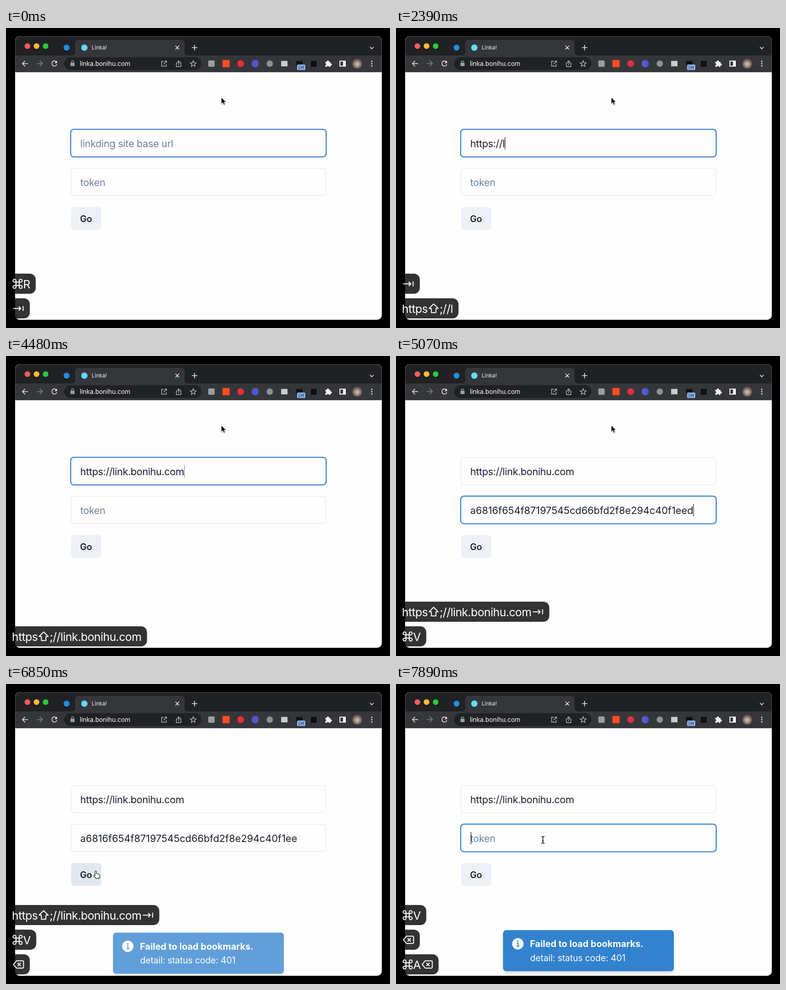
An HTML page that plays this animation: 843 px wide and 657 px high, repeating every 8000 ms.

```html
<!DOCTYPE html>
<html lang="en">
<head>
<meta charset="utf-8">
<title>Linka!</title>
<style>
html, body { margin: 0; width: 100%; height: 100%; overflow: hidden; background: #000; }
svg { display: block; width: 843px; height: 657px; }
text { font-family: Inter, "Liberation Sans", sans-serif; white-space: pre; }
.line { fill: none; stroke: #e8eaed; stroke-width: 1.6; }
.thin { fill: none; stroke: #bdc1c6; stroke-width: 1.3; }
.field { font-size: 21.8px; }
.key { font-size: 24.9px; letter-spacing: -.55px; fill: #fff; }
.glyph { fill: none; stroke: #fff; stroke-width: 2; stroke-linejoin: round; }
</style>
</head>
<body>
<svg viewBox="0 0 843 657" xmlns="http://www.w3.org/2000/svg">
  <defs>
    <clipPath id="win"><rect x="20" y="18" width="805" height="621" rx="10"/></clipPath>
    <radialGradient id="fur" cy=".55">
      <stop offset="0" stop-color="#d9cdc6"/><stop offset=".55" stop-color="#9b8880"/><stop offset="1" stop-color="#5d4a45"/>
    </radialGradient>
    <filter id="soft" x="-10%" y="-20%" width="120%" height="150%">
      <feDropShadow dx="0" dy="5" stdDeviation="3" flood-opacity=".12"/>
    </filter>
    <filter id="lift" x="-50%" y="-50%" width="200%" height="200%">
      <feDropShadow dx="0" dy="1" stdDeviation="1" flood-opacity=".35"/>
    </filter>
  </defs>
  <rect width="843" height="657"/>
  <g clip-path="url(#win)">
    <rect x="20" y="18" width="805" height="621" fill="#fefefe"/>
    <rect x="20" y="18" width="805" height="42" fill="#202124"/>
    <rect x="20" y="60" width="805" height="37" fill="#35363a"/>
    <rect x="20" y="96" width="805" height="1" fill="#55565a"/>
    <path d="M144 60q8 0 8-8V34q0-8 8-8H384q8 0 8 8V52q0 8 8 8z" fill="#35363a"/>
    <circle cx="47" cy="39.700" r="6.200" fill="#ff5f57"/>
    <circle cx="67" cy="39.700" r="6.200" fill="#febc2e"/>
    <circle cx="87" cy="39.700" r="6.200" fill="#28c840"/>
    <circle cx="133" cy="43" r="6.500" fill="#1c8fe3"/>
    <circle cx="172" cy="43" r="7" fill="#61dafb"/>
    <text x="188" y="47" font-size="12" fill="#f1f3f4">Linka!</text>
    <path class="line" d="M372 39l8 8m0-8l-8 8M414 37v12m-6-6h12M799 41.500l4 4 4-4"/>
    <path class="line" d="M48.500 78H36.500m5.500-6l-6 6 6 6"/>
    <path class="line" style="stroke:#808387" d="M67.500 78h12m-5.500-6l6 6-6 6"/>
    <path class="line" d="M110.500 74.200A5.600 5.600 0 1 0 111.600 79.200"/>
    <path d="M112 71.500v5.500h-5.500z" fill="#e8eaed"/>
    <rect x="128" y="64" width="301" height="28" rx="14" fill="#202124"/>
    <rect x="141.500" y="76" width="9" height="7.500" rx="1" fill="#9aa0a6"/>
    <path d="M143.500 76v-1.500a2.500 2.500 0 0 1 5 0V76" fill="none" stroke="#9aa0a6" stroke-width="1.3"/>
    <text x="162" y="83" font-size="14" letter-spacing="-.1" fill="#fff">linka.bonihu.com</text>
    <path class="thin" d="M346 73h-4.500v10.500h10.500V79M348.500 72.500h4v4M352 73l-6.500 6.500"/>
    <path class="thin" d="M376.500 76.500h-2.500v8h10v-8h-2.500M379 81v-9m-3 3l3-3 3 3"/>
    <path class="thin" id="star"/>
    <rect x="444" y="71" width="14" height="14" rx="2" fill="#9b9da0"/>
    <rect x="475" y="70" width="16" height="16" rx="1" fill="#ff4a1c"/>
    <circle cx="515" cy="78" r="7.500" fill="#e0303a"/>
    <circle cx="547" cy="78" r="8" fill="#5257d2"/>
    <circle cx="579" cy="78" r="7" fill="#8d9095"/>
    <rect x="604" y="72" width="14" height="12" fill="#c8cacd"/>
    <rect x="637" y="72" width="14" height="12" fill="#111"/>
    <rect x="639" y="80" width="18" height="12" rx="2" fill="#8ab4f8"/>
    <text x="648" y="89.600" font-size="9" text-anchor="middle" fill="#202124">Off</text>
    <rect x="669" y="72" width="13" height="13" fill="#101113"/>
    <path fill="#f1f3f4" d="M701 74h3.500a2.300 2.300 0 1 1 4.400 0h3.500v3.600a2.300 2.300 0 1 1 0 4.400v3h-3.600a2.100 2.100 0 1 0-4.200 0H701v-3.600a2.100 2.100 0 1 0 0-4.200z"/>
    <rect x="733" y="72.500" width="12" height="11" fill="none" stroke="#fff" stroke-width="2"/>
    <rect x="740" y="73" width="5" height="10" fill="#fff"/>
    <circle cx="771" cy="78" r="11" fill="url(#fur)"/>
    <g fill="#e8eaed"><circle cx="803" cy="73" r="1.600"/><circle cx="803" cy="78" r="1.600"/><circle cx="803" cy="83" r="1.600"/></g>

    <rect id="box0"/><rect id="box1"/>
    <rect id="mark" x="163.500" y="324" height="27" fill="#b3d7fe"/>
    <text id="text0" class="field" x="163" y="261.300"></text>
    <text id="text1" class="field" x="163" y="346.300"></text>
    <rect id="caret" width="1.200" height="27" fill="#111"/>
    <rect id="go" x="143" y="392" width="66" height="50" rx="7"/>
    <text x="162.500" y="424.700" font-size="19.500" font-weight="600" letter-spacing="-.2" fill="#1a202c">Go</text>

    <g id="toast" fill="#fff">
      <rect x="235" y="539" width="375" height="90" rx="7" fill="#3182ce" filter="url(#soft)"/>
      <circle cx="267.500" cy="569" r="12.500"/>
      <circle cx="267.300" cy="563.700" r="1.700" fill="#3182ce"/>
      <path d="M264.800 567.800h3v6.400m-3.300 0h6.600" fill="none" stroke="#3182ce" stroke-width="2"/>
      <text x="294" y="576.200" font-size="19.900" font-weight="700">Failed to load bookmarks.</text>
      <text x="294.500" y="606.800" font-size="19.400" letter-spacing="-.1">detail: status code: 401</text>
    </g>
  </g>
  <rect x="20.500" y="18.500" width="804" height="620" rx="9.500" fill="none" stroke="#fff" stroke-opacity=".22"/>
  <g id="cursor" filter="url(#lift)"></g>
  <g id="keys"></g>
</svg>
<script>
const LOOP = 8000, STEP = 148.8;
const URL_TEXT = 'https://link.bonihu.com';
const TOKEN = 'a6816f654f87197545cd66bfd2f8e294c40f1ee';
const INK = '#1a202c', HINT = '#718096';
const $ = id => document.getElementById(id);

// [step, number of characters typed]
const TYPED = [[0, 0], [7, 1], [8, 2], [9, 3], [10, 4], [12, 5], [13, 6], [14, 8], [16, 9], [17, 11], [18, 12],
  [20, 13], [22, 15], [23, 16], [25, 18], [26, 19], [28, 20], [29, 22], [30, 23]];
const CARET = [[0, 0], [4, 1], [30, .5], [31, 0], [32, 1], [36, 0], [41, 1], [44, 0], [50, 1], [52, 0], [53, 1]];
const FOCUS = [[0, 0], [32, 1], [44, -1], [50, 1]];
// [step, [x, y, shape]]
const POINTER = [[0, [472.700, 152, 'arrow']], [36, [430, 192, 'arrow']], [37, [360, 246, 'beam']], [38, [326.500, 271.300, 'beam']],
  [41, [312, 290, 'arrow']], [42, [252, 352, 'beam']], [43, [186, 412, 'hand']], [46, [197, 410, 'hand']],
  [47, [250, 393, 'arrow']], [48, [297.600, 372.800, 'arrow']], [49, [316, 350, 'beam']], [50, [322.500, 341.300, 'beam']]];

const SHAPES = {
  arrow: '<path d="M0 0V14.500l3.300-3.100 2.400 5.200 2.500-1.100-2.400-5H10.300z" fill="#000" stroke="#fff" stroke-width="1"/>',
  beam: '<path d="M-3.500-7.500Q0-7.500 0-5Q0-7.500 3.500-7.500M0-5V5M-3.500 7.500Q0 7.500 0 5Q0 7.500 3.500 7.500M-2 2H2" fill="none" stroke="#111" stroke-width="1.3"/>',
  hand: '<path d="M-1.500 0q1.500-1.500 3 0v5l6 1.500q2 .5 1.500 3l-1.500 6h-7l-5-6q0-2 3 0z" fill="#fff" stroke="#000"/>'
};
const GLYPHS = {
  '⌘': [24.500, 'M8.900 6.800V-6.800A3.200 3.200 0 1 0 5.700-3.600H19.300A3.200 3.200 0 1 0 16.100-6.800V6.800A3.200 3.200 0 1 0 19.300 3.600H5.700A3.200 3.200 0 1 0 8.900 6.800Z'],
  '⇧': [26, 'M13-10L23 0H18V9H8V0H3Z'],
  '⇥': [27, 'M3 0H19M15-4.500L19.500 0 15 4.500M24.500-5.500V5.500'],
  '⌫': [27, 'M10-8H23.500a2 2 0 0 1 2 2V6a2 2 0 0 1-2 2H10L3.500 0ZM12.500-3.500l7 7m0-7l-7 7']
};

const at = (list, k) => list.filter(e => e[0] <= k).pop()[1];
const set = (el, attrs) => { for (const n in attrs) el.setAttribute(n, attrs[n]); return el; };
const add = (parent, tag, attrs) =>
  parent.appendChild(set(document.createElementNS('http://www.w3.org/2000/svg', tag), attrs));

function drawBox(i, focused, hover) {
  const grow = focused ? .6 : 0;
  set($('box' + i), {
    x: 142.6 - grow, y: 222.4 + 85 * i - grow, width: 559.7 + 2 * grow, height: 59.3 + 2 * grow, rx: 7, fill: '#fefefe',
    stroke: focused ? '#3182ce' : hover ? '#cbd5e0' : '#e2e8f0', 'stroke-width': focused ? 2.3 : 1.2
  });
}

function drawText(i, value, hint, gap, hintGap) {
  const el = $('text' + i);
  el.textContent = value || hint;
  el.style.letterSpacing = (value ? gap : hintGap) + 'px';
  el.style.fill = value ? INK : HINT;
  return value ? el.getComputedTextLength() : 1;
}

function drawKey(label, row, opacity) {
  const top = 592 - 54 * row, base = top + 31.7;
  const g = add($('keys'), 'g', { opacity });
  const pill = add(g, 'rect', { x: -20, y: top, height: 44, rx: 13, fill: '#000', 'fill-opacity': .8 });
  let x = 13;
  for (const part of label.split(/([⌘⇧⇥⌫])/).filter(Boolean)) {
    const glyph = GLYPHS[part];
    if (glyph) {
      add(g, 'path', { class: 'glyph', d: glyph[1], transform: `translate(${x} ${base - 9.5})` });
      x += glyph[0];
    } else {
      const t = add(g, 'text', { class: 'key', x, y: base });
      t.textContent = part;
      x += t.getComputedTextLength();
    }
  }
  pill.setAttribute('width', x + 32.3);
}

// Newest key group first
function keyRows(k, url) {
  const typed = url.replace(':', '⇧;') + (k >= 32 ? '⇥' : '');
  if (k < 7) return ['⇥', '⌘R'];
  if (k < 8) return [typed, '⇥', '⌘R'];
  if (k < 18) return [typed, '⇥'];
  if (k < 34) return [typed];
  if (k < 40) return ['⌘V', typed];
  if (k < 52) return ['⌫', '⌘V', typed];
  return [k < 53 ? '⌘A' : '⌘A⌫', '⌫', '⌘V'];
}

function draw(k) {
  const url = URL_TEXT.slice(0, at(TYPED, k));
  const token = k < 34 || k >= 53 ? '' : k < 40 ? TOKEN + 'd' : TOKEN;
  const focus = at(FOCUS, k);
  const [px, py, shape] = at(POINTER, k);

  for (const i of [0, 1]) drawBox(i, focus === i, py > 222 + 85 * i && py < 282 + 85 * i);
  const ends = [
    drawText(0, url, 'linkding site base url', -.39, -.33),
    drawText(1, token, 'token', 0, -.42)
  ];
  const row = Math.max(focus, 0);
  set($('caret'), { x: 163 + ends[row], y: 239 + 85 * row, opacity: at(CARET, k) });
  set($('mark'), { width: k === 52 ? ends[1] : 0 });
  set($('go'), { fill: shape !== 'hand' ? '#edf1f5' : k === 44 ? '#cbd5e0' : '#e2e8f0' });

  const p = Math.min(1, Math.max(0, (k * STEP - 6690) / 400));
  const shown = 1 - (1 - p) ** 3;
  set($('toast'), { opacity: shown, transform: `translate(0 ${24 * (1 - shown)})` });

  $('cursor').innerHTML = SHAPES[shape];
  set($('cursor'), { transform: `translate(${px} ${py})` });

  $('keys').textContent = '';
  keyRows(k, url).forEach((label, i) => {
    const fading = k === 7 && i === 2 || k === 17 && i === 1;
    drawKey(label, i, fading ? .55 : 1);
  });
}

let star = '';
for (let i = 0; i < 10; i++) {
  const r = i % 2 ? 3 : 7, a = (i / 5 - .5) * Math.PI;
  star += (i ? 'L' : 'M') + (411 + r * Math.cos(a)) + ' ' + (78.5 + r * Math.sin(a));
}
set($('star'), { d: star + 'Z' });

let last = -1;
const start = performance.now();
function tick() {
  const k = Math.floor((performance.now() - start) % LOOP / STEP);
  if (k !== last) draw(last = k);
  requestAnimationFrame(tick);
}
tick();
</script>
</body>
</html>
```
